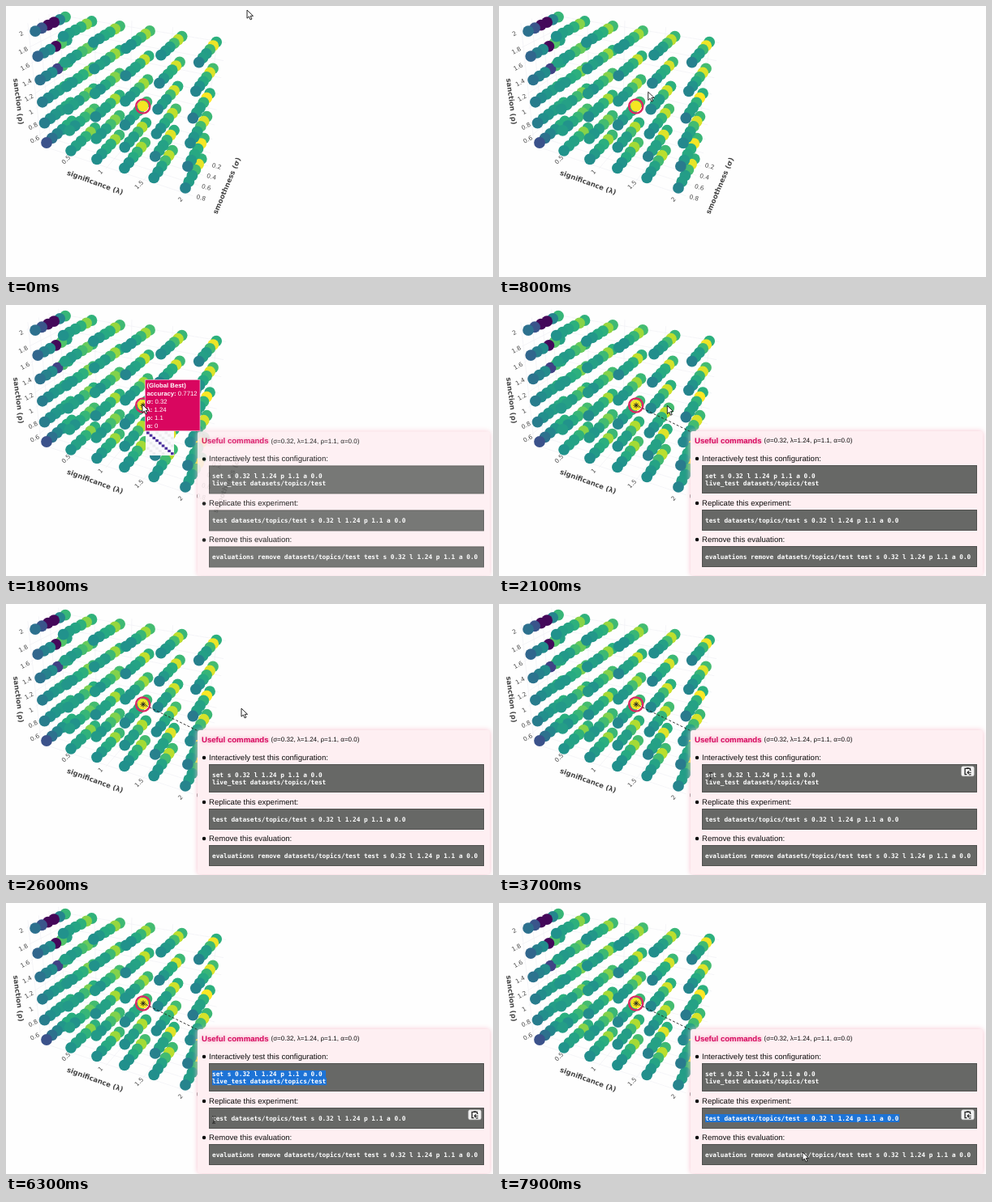
An HTML page that plays this animation: 600 by 335 pixels, repeating every 8 s.

```html
<!DOCTYPE html>
<html lang="en">
<head>
<meta charset="utf-8">
<title>Parameter explorer</title>
<style>
  html, body { margin: 0; width: 100%; height: 100%; overflow: hidden; background: #fefefe; }
  svg { display: block; width: 600px; height: 335px; }
  text { text-rendering: geometricPrecision; white-space: pre; }
  .axis { font: 7.4px "DejaVu Sans", sans-serif; fill: #4a4a4a; text-anchor: middle; dominant-baseline: central; }
  .axis.name { font-size: 8.5px; font-weight: bold; fill: #444; }
  .tip { font: 7.75px "Liberation Sans", Arial, sans-serif; fill: #fff; }
  .head { font: 9.58px "Liberation Sans", Arial, sans-serif; fill: #0c0c0c; }
  .title { font-weight: bold; fill: #d6085d; filter: drop-shadow(0 0 2px #f49abd); }
  .small { font-size: 8px; }
  .code { font: bold 7.78px "DejaVu Sans Mono", monospace; fill: #fff; }
  .b { font-weight: bold; }
  #card { filter: drop-shadow(0 0 3px #f9c3d0); }
</style>
</head>
<body>
<svg viewBox="0 0 600 335" id="stage">
  <g id="grid" stroke="#eeeff4" stroke-width=".6"></g>
  <g id="labels"></g>
  <g id="dots"></g>
  <g id="best">
    <circle cx="168.7" cy="124" r="6.5" fill="#f6e622"/>
    <circle cx="168.7" cy="124" r="8.6" fill="none" stroke="#dc2860" stroke-width="2.4"/>
  </g>
  <g id="picked" stroke="#222" stroke-width="1">
    <path d="M169 120.6v7M165.5 124.1h7M166.5 121.6l5 5M171.5 121.6l-5 5"/>
    <path d="M172 125.4L245 161" stroke-dasharray="3 2.2" stroke-width=".9"/>
  </g>
  <g id="panel">
    <rect id="card" x="236" y="156" width="360" height="178" rx="3" fill="#feeff2"/>
    <text x="241" y="170.5" class="head title">Useful commands</text>
    <text x="326.5" y="170.2" class="head small">(σ=0.32, λ=1.24, ρ=1.1, α=0.0)</text>
    <g id="boxes"></g>
    <g id="marks" fill="#1d73d6"></g>
    <g id="codes"></g>
    <g id="copy">
      <rect x="-7.8" y="-6" width="15.6" height="12" rx="2" fill="#f2f2f2" stroke="#ccc" stroke-width=".5"/>
      <path d="M-1 3.8h-2.4v-7.3h6.4v2.4M-1.5 -3.8h3.2" fill="none" stroke="#222" stroke-width="1.3"/>
      <path d="M4.2 1.4h-4.6m1.9-1.9l-1.9 1.9 1.9 1.9M3.4 -.8v-1M3.4 3.2v1h-2" fill="none" stroke="#222" stroke-width="1.1"/>
    </g>
  </g>
  <g id="tip">
    <g id="matrix"></g>
    <rect x="171.5" y="92.5" width="67.5" height="63" fill="#d9065f" stroke="#eda3c2" stroke-width=".8"/>
    <g id="facts"></g>
  </g>
  <path id="arrow" d="M0 0v10.2l2.4-2.2 1.7 3.9 1.8-.8-1.7-3.8h3.3z" fill="#fff" stroke="#111" stroke-width=".9"/>
  <path id="beam" d="M-1.8 -4.2h1.2l.6.6.6-.6h1.2M0 -3.6v7.2M-1.8 4.2h1.2l.6-.6.6.6h1.2" fill="none" stroke="#111" stroke-width=".9"/>
</svg>
<script>
const LOOP = 8000, STEP = 100;
const $ = id => document.getElementById(id);
const clamp = (v, lo, hi) => Math.max(lo, Math.min(hi, v));

function add(parent, tag, attrs, content) {
  const el = document.createElementNS('http://www.w3.org/2000/svg', tag);
  for (const key in attrs) el.setAttribute(key, attrs[key]);
  if (content) el.innerHTML = content;
  return parent.appendChild(el);
}

// Camera: unit cube (lambda, rho, depth) to homogeneous stage coordinates.
const ORIGIN = [50, 169, 1];
const AXES = [[138.5, 22.9, -.147], [-19, -142.3, -.14], [38.3, -13.8, .089]];
function project(...cube) {
  const [x, y, w] = ORIGIN.map((o, n) => o + cube.reduce((sum, c, a) => sum + c * AXES[a][n], 0));
  return { x: x / w, y: y / w, w };
}

function drawGrid() {
  const lo = -.05, hi = 1.05;
  const line = (a, b) => {
    const p = project(...a), q = project(...b);
    add($('grid'), 'line', { x1: p.x, y1: p.y, x2: q.x, y2: q.y });
  };
  for (let v = .6; v < 2.05; v += .2) {
    const r = (v - .5) / 1.5;
    line([lo, r, lo], [lo, r, hi]);
    line([lo, r, hi], [hi, r, hi]);
  }
  for (let v = .5; v < 2.1; v += .5) {
    const l = (v - .1) / 1.9;
    line([l, lo, lo], [l, lo, hi]);
    line([l, lo, hi], [l, hi, hi]);
  }
  for (let s = 0; s < 1.1; s += 1 / 3) {
    line([lo, lo, s], [hi, lo, s]);
    line([lo, lo, s], [lo, hi, s]);
  }
}

function label(text, x, y, angle, name = '') {
  add($('labels'), 'text', { class: 'axis ' + name, transform: `translate(${x} ${y}) rotate(${angle})` }, text);
}

function drawLabels() {
  ['2', '1.8', '1.6', '1.4', '1.2', '1', '0.8', '0.6'].forEach((s, n) =>
    label(s, 18.8 + 2.4 * n, 34.3 + 21.2 * n - .36 * n * n, -28));
  [['0.5', 74, 190], ['1', 116.5, 205], ['1.5', 164, 221], ['2', 215, 239]]
    .forEach(([s, x, y]) => label(s, x, y, -45));
  ['0.2', '0.4', '0.6', '0.8'].forEach((s, n) => label(s, 259.5 - 6.4 * n, 198 + 13 * n, 14));
  label('sanction (ρ)', 14.5, 118, 83, 'name');
  label('significance (λ)', 109.5, 219, 20, 'name');
  label('smoothness (σ)', 272.8, 222.5, -67, 'name');
}

const VIRIDIS = ['440154', '472d7b', '3b528b', '2c728e', '21918c', '28ae80', '5ec962', 'addc30', 'fde725']
  .map(hex => [0, 2, 4].map(n => parseInt(hex.substr(n, 2), 16)));
function viridis(v) {
  const s = clamp(v, 0, 1) * 8, n = Math.min(7, Math.floor(s));
  return `rgb(${VIRIDIS[n].map((c, m) => Math.round(c + (VIRIDIS[n + 1][m] - c) * (s - n)))})`;
}

// Scores of the lowest-significance column, one row per sanction level.
const WEAK = [
  [.25, .37, .45, .52, .62, .63],
  [.42, .49, .52, .55, .6, .63],
  [.42, .48, .52, .55, .64, .63],
  [.38, .44, .48, .2, .7, .6],
  [.33, .43, .48, .02, .72, .57],
  [.37, .26, .02, .02, .45, .66]
];
function score(i, j, k) {
  if (!i) return WEAK[j][k];
  const base = [.56 - .025 * i, .54, .58, .66, .74 + .046 * i, .66][k];
  return base + .03 * Math.sin(i * 5.1 + j * 3.7 + k * 2.3);
}

function drawDots() {
  const dots = [];
  for (let n = 0; n < 216; n++) {
    const i = n % 6, j = Math.floor(n / 6) % 6, k = Math.floor(n / 36);
    dots.push({ ...project(i / 5, j / 5, k / 5), fill: viridis(score(i, j, k)) });
  }
  dots.sort((a, b) => b.w - a.w)
    .forEach(d => add($('dots'), 'circle', { cx: d.x, cy: d.y, r: 6.9, fill: d.fill }));
}

const BOXES = [
  { y: 198, h: 35, head: 'Interactively test this configuration:', lines: ['set s 0.32 l 1.24 p 1.1 a 0.0', 'live_test datasets/topics/test'] },
  { y: 253, h: 26, head: 'Replicate this experiment:', lines: ['test datasets/topics/test s 0.32 l 1.24 p 1.1 a 0.0'] },
  { y: 298, h: 26, head: 'Remove this evaluation:', lines: ['evaluations remove datasets/topics/test test s 0.32 l 1.24 p 1.1 a 0.0'] }
];
function drawPanel() {
  for (const { y, h, head, lines } of BOXES) {
    add($('boxes'), 'circle', { cx: 244, cy: y - 8, r: 2.25, fill: '#0c0c0c' });
    add($('boxes'), 'text', { class: 'head', x: 250, y: y - 5 }, head);
    add($('boxes'), 'rect', { x: 250.5, y: y + .5, width: 338, height: h - 1, fill: '#676866', stroke: '#50514f' });
    lines.forEach((line, n) => add($('codes'), 'text', { class: 'code', x: 254, y: y + 15.8 + 9.1 * n }, line));
  }
}
const marks = [[207, 9.2], [216, 9.2], [261, 10]].map(([y, height]) =>
  add($('marks'), 'rect', { x: 254, y, height, width: 0 }));

function drawTip() {
  const facts = [['(Global Best)', ''], ['accuracy:', ' 0.7712'], ['σ:', ' 0.32'], ['λ:', ' 1.24'], ['ρ:', ' 1.1'], ['α:', ' 0']];
  facts.forEach(([key, value], n) => add($('facts'), 'text', { class: 'tip', x: 173.5, y: 101.6 + 10 * n },
    `<tspan class="b">${key}</tspan>${value}`));
  add($('matrix'), 'rect', { x: 172, y: 155, width: 35, height: 31, fill: '#fafafc' });
  for (let n = 0; n < 81; n++) {
    const col = n % 9, row = Math.floor(n / 9), hit = col === row;
    if (hit || (col * 7 + row * 5) % 3 === 0)
      add($('matrix'), 'rect', { x: 173 + 3.75 * col, y: 156.5 + 3.2 * row, width: 3.6, height: 3.1, fill: hit ? '#4a2d9c' : '#ebebef' });
  }
}

// Pointer stops: time, x, y.
const PATH = [
  [0, 297, 5], [100, 295, 7], [500, 225, 62], [900, 170, 121], [1000, 168, 123], [1900, 168, 123],
  [2500, 286, 127], [2600, 290, 129], [2700, 290, 132], [3000, 300, 262], [3200, 290, 305],
  [3600, 262, 213], [4100, 256, 212], [4400, 256, 212], [4800, 383, 224.5], [5100, 384, 224],
  [5300, 376, 236], [5700, 312, 304], [6100, 262, 269], [6300, 256, 268], [6500, 256, 268],
  [7000, 405, 268], [7200, 483, 270], [7400, 500, 272], [7600, 410, 275], [7800, 408, 276], [7900, 374, 308]
];
function pointerAt(t) {
  const n = PATH.findIndex(stop => stop[0] > t);
  if (n < 1) return (n ? PATH[PATH.length - 1] : PATH[0]).slice(1);
  const [t0, x0, y0] = PATH[n - 1], [t1, x1, y1] = PATH[n], p = (t - t0) / (t1 - t0);
  return [x0 + (x1 - x0) * p, y0 + (y1 - y0) * p];
}

const show = (id, on) => $(id).style.display = on ? '' : 'none';

function render(t) {
  const [x, y] = pointerAt(t);
  const typing = (t >= 3500 && t < 4750) || (t >= 6000 && t < 7300);
  for (const id of ['arrow', 'beam']) $(id).setAttribute('transform', `translate(${x} ${y})`);
  show('arrow', !typing);
  show('beam', typing);
  show('tip', t >= 900 && t < 2000);
  show('picked', t >= 1800);

  const fade = clamp((t - 1600) / 225, 0, 1);
  show('panel', t >= 1700);
  $('panel').setAttribute('opacity', fade);
  $('panel').setAttribute('transform', `translate(0 ${(1 - fade) * 4})`);

  // The copy button trails the pointer a little.
  const [bx, by] = pointerAt(Math.max(0, t - 150));
  const hovered = t >= 2700 && BOXES.find(b => bx > 250 && by > b.y && by < b.y + b.h);
  show('copy', hovered);
  if (hovered) $('copy').setAttribute('transform', `translate(577.5 ${hovered.y + 8.8})`);

  const first = t >= 4500 && t < 6400;
  const widths = [
    first ? 140 : 0,
    first ? 141 * clamp((t - 4450) / 300, 0, 1) : 0,
    t < 6500 ? 0 : t >= 7300 ? 239.3 : clamp(x - 254, 0, 239.3)
  ];
  marks.forEach((mark, n) => mark.setAttribute('width', widths[n]));
}

drawGrid();
drawLabels();
drawDots();
drawPanel();
drawTip();

const start = performance.now();
function tick() {
  const t = (performance.now() - start) % LOOP;
  render(Math.floor(t / STEP) * STEP);
  requestAnimationFrame(tick);
}
tick();
</script>
</body>
</html>
```
